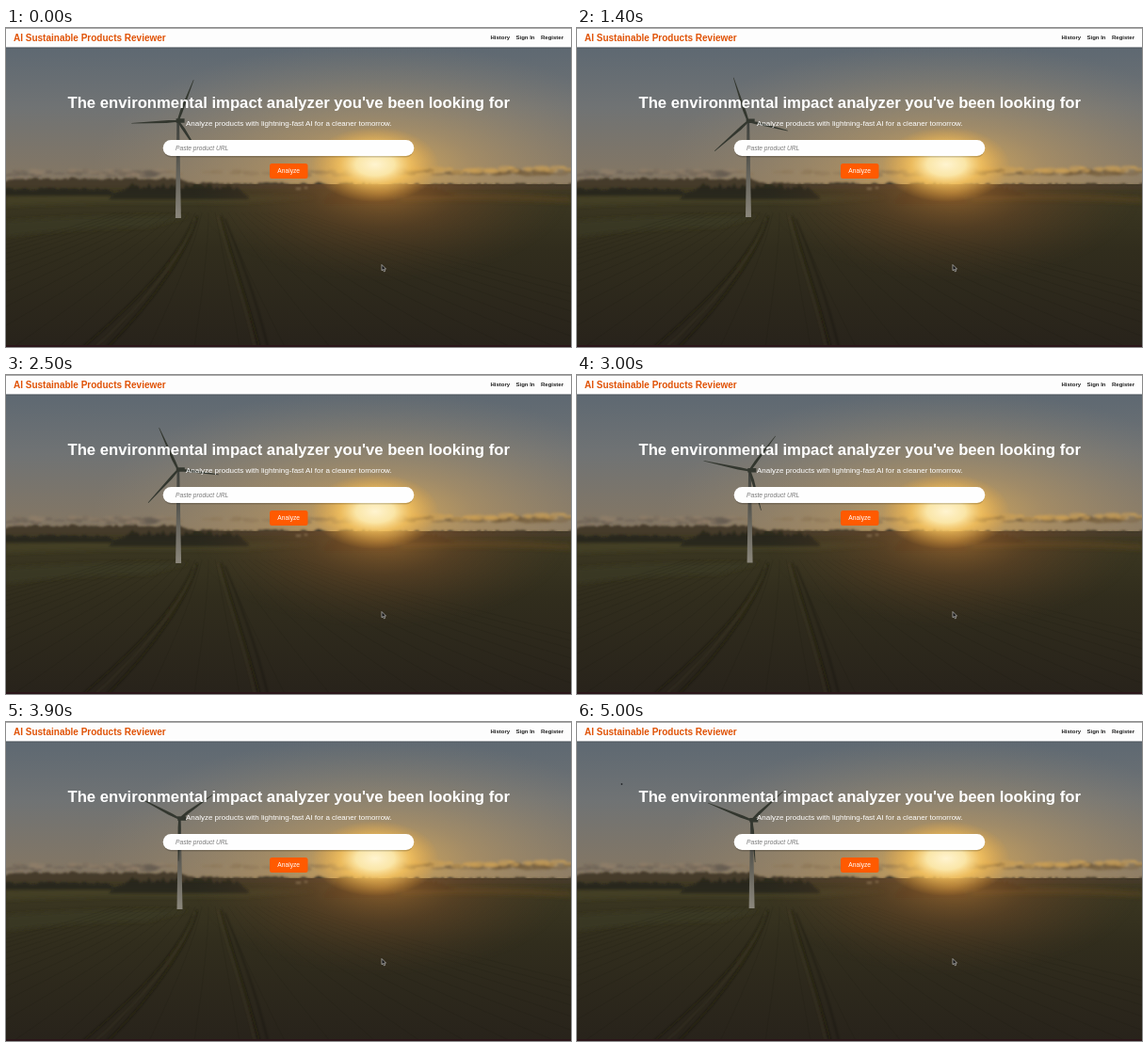
Write an HTML page that moves like this. It is 600 px wide and 339 px high and loops after 5100 ms.

```html
<!DOCTYPE html>
<html lang="en">
<head>
<meta charset="utf-8">
<title>AI Sustainable Products Reviewer</title>
<style>
  html, body { margin: 0; width: 100%; height: 100%; overflow: hidden; background: #262119; }
  svg { display: block; width: 600px; height: 339px; font-family: "Liberation Sans", Arial, sans-serif; }
  .bold { font-weight: bold; }
  .nav { font-size: 6px; fill: #222; }
</style>
</head>
<body>
<svg viewBox="0 0 600 339">
  <defs>
    <linearGradient id="sky" x2="0" y2="1">
      <stop offset="0" stop-color="#586571"/>
      <stop offset=".5" stop-color="#707374"/>
      <stop offset="1" stop-color="#867762"/>
    </linearGradient>
    <linearGradient id="field" x2="0" y2="1">
      <stop offset="0" stop-color="#423a26"/>
      <stop offset=".12" stop-color="#3a3621"/>
      <stop offset=".4" stop-color="#312d1d"/>
      <stop offset="1" stop-color="#28231b"/>
    </linearGradient>
    <radialGradient id="haze">
      <stop offset="0" stop-color="#f0bb55" stop-opacity=".8"/>
      <stop offset=".35" stop-color="#d0a662" stop-opacity=".45"/>
      <stop offset="1" stop-color="#a09078" stop-opacity="0"/>
    </radialGradient>
    <radialGradient id="sun">
      <stop offset="0" stop-color="#fff4d0"/>
      <stop offset=".3" stop-color="#fae6a8"/>
      <stop offset=".55" stop-color="#fcc75e" stop-opacity=".7"/>
      <stop offset="1" stop-color="#eea83c" stop-opacity="0"/>
    </radialGradient>
    <radialGradient id="warm">
      <stop offset="0" stop-color="#c07c34" stop-opacity=".6"/>
      <stop offset=".4" stop-color="#86532a" stop-opacity=".36"/>
      <stop offset="1" stop-color="#5a4028" stop-opacity="0"/>
    </radialGradient>
    <linearGradient id="steel" x2="0" y2="1">
      <stop offset="0" stop-color="#3d403c"/>
      <stop offset=".4" stop-color="#57564f"/>
      <stop offset="1" stop-color="#8b877c"/>
    </linearGradient>
    <filter id="soft"><feGaussianBlur stdDeviation=".8"/></filter>
    <filter id="softer" x="-20%" y="-50%" width="140%" height="200%"><feGaussianBlur stdDeviation="2"/></filter>
    <clipPath id="ground"><path d="M0 166H600V339H0z"/></clipPath>
  </defs>

  <rect width="600" height="168" fill="url(#sky)"/>
  <ellipse cx="392" cy="150" rx="300" ry="135" fill="url(#haze)"/>
  <g id="clouds" filter="url(#soft)"></g>

  <rect y="166" width="600" height="173" fill="url(#field)"/>
  <g clip-path="url(#ground)">
    <g filter="url(#softer)">
      <path d="M0 179Q120 173 330 180L250 186Q110 184 0 189z" fill="#48462a" opacity=".6"/>
      <path d="M420 178Q520 174 600 180V186Q510 181 420 184z" fill="#594621" opacity=".6"/>
      <path d="M0 205Q100 198 195 200L150 212Q70 212 0 222z" fill="#3d3c23" opacity=".6"/>
    </g>
    <g id="rows" fill="none" stroke="#1c1a12" stroke-opacity=".12"></g>
    <g fill="none" stroke="#1b180f" stroke-opacity=".5" filter="url(#soft)">
      <path d="M203 200C195 232 162 285 108 339" stroke-width="2"/>
      <path d="M199 205C186 240 145 285 82 339" stroke-width="1.6"/>
      <path d="M228 200C236 232 257 290 269 339" stroke-width="2"/>
      <path d="M233 203C244 232 264 280 278 339" stroke-width="1"/>
      <path d="M201 202C191 236 154 285 95 339M225 200C233 232 253 290 264 339" stroke="#5a5036" stroke-opacity=".45"/>
    </g>
  </g>
  <g filter="url(#soft)">
    <path id="farTrees" fill="#453a29"/>
    <path id="hedge" fill="#25241b" opacity=".75"/>
    <path id="grove" fill="#3b2c1a" opacity=".75"/>
    <path d="M308 171h5M317 170h3" stroke="#8f8266" stroke-width="1.5"/>
  </g>
  <ellipse cx="400" cy="174" rx="200" ry="95" fill="url(#warm)" clip-path="url(#ground)"/>
  <ellipse cx="392" cy="145" rx="68" ry="40" fill="url(#sun)"/>
  <rect y="337" width="600" height="2" fill="#2b161a"/>

  <path id="tower" fill="url(#steel)"/>
  <path id="rotor" fill="#33372f"/>
  <circle id="bird" cx="47.5" cy="66" r=".9" fill="#26292c"/>

  <path d="M0 20H600V22H0z" fill="#222" opacity=".15"/>
  <rect width="600" height="20.4" fill="#fdfdfd"/>
  <rect width="600" height=".6" fill="#777"/>
  <text class="bold" x="8" y="13.7" font-size="10" fill="#e05206">AI Sustainable Products Reviewer</text>
  <g class="bold nav">
    <text x="514.5" y="12.2">History</text>
    <text x="541.5" y="12.2">Sign In</text>
    <text x="568" y="12.2">Register</text>
  </g>
  <g text-anchor="middle" fill="#fff">
    <text class="bold" x="300.2" y="85" font-size="16.7">The environmental impact analyzer you've been looking for</text>
    <text x="300.3" y="104.3" font-size="8">Analyze products with lightning-fast AI for a cleaner tomorrow.</text>
    <rect x="167" y="120" width="266" height="17.5" rx="8.7" fill="#000" opacity=".18"/>
    <rect x="166.7" y="119" width="266.6" height="17" rx="8.5" fill="#fefefe"/>
    <rect x="280" y="144" width="40.5" height="16" rx="2.5" fill="#ff5a00"/>
    <text x="300.2" y="154.4" font-size="6.67">Analyze</text>
  </g>
  <text x="180" y="129.8" font-size="6.67" font-style="italic" fill="#777">Paste product URL</text>
  <path d="M399 251.5v6.2l1.4-1.2 1 2.3 1.2-.5-1-2.2h1.9z" fill="#111" stroke="#ddd" stroke-width=".6"/>
</svg>
<script>
const $ = id => document.getElementById(id);
const LOOP = 5100, STEP = 100;

let seed = 7;
const rand = () => (seed = seed * 16807 % 2147483647) / 2147483647;

function puffs(count, x0, x1, y, color, opacity) {
  let out = "";
  for (let i = 0; i < count; i++) {
    const x = x0 + (x1 - x0) * rand();
    out += `<ellipse cx="${x}" cy="${y + 5 * rand()}" rx="${3 + 6 * rand()}" ry="${1 + 1.6 * rand()}" fill="${color}" opacity="${opacity}"/>`;
  }
  return out;
}

// Bumpy top edge between two x positions, closed along a flat bottom.
function trees(x0, x1, top, bottom, bump) {
  let d = `M${x0} ${bottom}`;
  for (let x = x0; x <= x1; x += 3) {
    const edge = Math.min(1, (x - x0 + 3) / 20, (x1 - x + 3) / 20);
    d += `L${x} ${bottom - (bottom - top + bump * (rand() - .5)) * edge}`;
  }
  return d + `L${x1} ${bottom}z`;
}

$("clouds").innerHTML =
  puffs(40, 0, 170, 152, "#675e52", .5) + puffs(25, 0, 170, 151, "#94826a", .35) +
  puffs(30, 175, 370, 152, "#8a7352", .4) +
  puffs(55, 412, 600, 151, "#775f3e", .5) + puffs(40, 412, 600, 148, "#cba056", .5);

$("farTrees").setAttribute("d",
  trees(-12, 200, 160, 169, 3) + trees(170, 350, 165, 170, 3) + trees(395, 620, 166, 171, 3));
$("hedge").setAttribute("d", trees(-20, 120, 171, 178, 4) + trees(110, 258, 168, 182, 7));
$("grove").setAttribute("d", trees(338, 414, 166, 187, 6) + trees(400, 475, 170, 178, 4));

for (let i = -14; i <= 14; i++)
  $("rows").innerHTML += `<path d="M${215 + i * 7} 196Q${215 + i * 16} 240 ${200 + i * 48} 339"/>`;

const mix = (a, b, k) => a + (b - a) * k;

// The tips circle a point left of and above the hub, as the rotor is seen at a slant.
function blade(x, y, degrees) {
  const a = degrees * Math.PI / 180, c = Math.cos(a), s = Math.sin(a);
  const dx = 46.5 * c - 3, dy = 46.5 * s - 1.5;
  const at = (along, side) => `${x + dx * along - s * side} ${y + dy * along + c * side}`;
  return `M${at(0, -1)}L${at(.25, -1.7)}L${at(1, -.3)}L${at(1, .3)}L${at(.2, 1.3)}L${at(0, 1)}z`;
}

function draw(now) {
  const t = Math.floor(now % LOOP / STEP) * STEP / 1000;
  const early = t < .7, k = early ? t / .7 : (t - .7) / 4.3;
  const x = early ? mix(182.6, 181, k) : mix(181, 185.3, k);
  const y = early ? mix(98.7, 98, k) : mix(98, 104.5, k);
  const base = 202 - .8 * t, turn = 55 - 114.7 * t;
  $("tower").setAttribute("d", `M${x - 1.2} ${y}h2.6L${x + 3.3} ${base}h-6z`);
  $("rotor").setAttribute("d", `M${x - 2} ${y - 2.5}h9v4.5h-9z` +
    [0, 120, 240].map(a => blade(x, y, turn + a)).join(""));
  $("bird").style.display = t > 4.85 ? "" : "none";
}

const start = performance.now();
function tick() {
  draw(performance.now() - start);
  requestAnimationFrame(tick);
}
tick();
</script>
</body>
</html>
```
